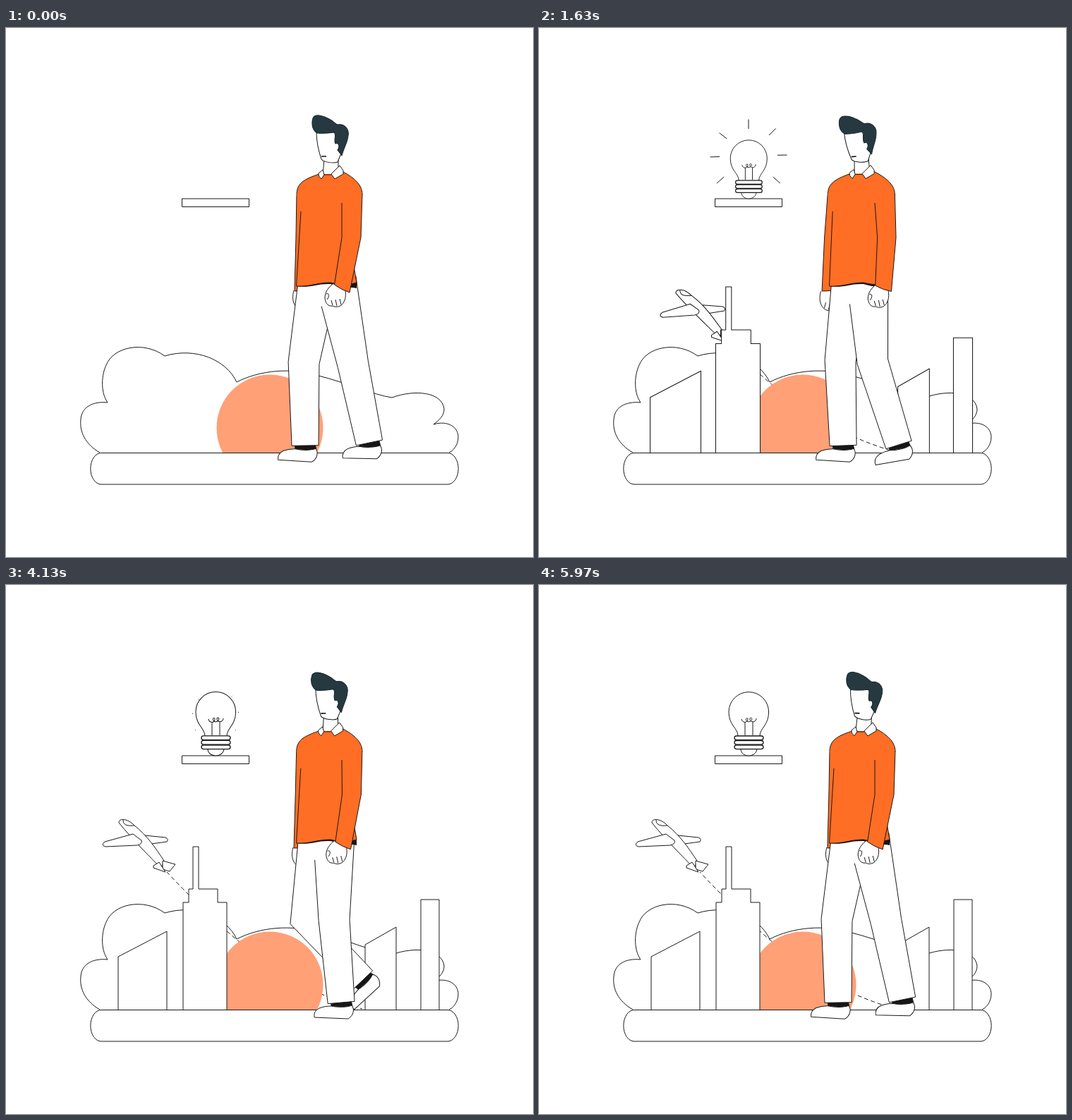
Write an HTML page with a canvas that moves like this. It is 747 by 750 pixels and loops after 6010 ms.

```html
<!DOCTYPE html>
<html lang="en">
<head>
<meta charset="utf-8">
<title>Walking through the city</title>
<style>
html, body { margin: 0; width: 100%; height: 100%; overflow: hidden; background: #fff; }
canvas { display: block; }
</style>
</head>
<body>
<canvas id="stage" width="747" height="750"></canvas>
<script>
const c = document.getElementById('stage').getContext('2d');
const LOOP = 6010, INK = '#1a1a1a', ORANGE = '#ff6e24', HAIR = '#263940', SUN = '#ffa077';

// Smooth curve through rows of [time, ...values], held at both ends.
function spline(rows, x) {
  const last = rows.length - 1;
  if (x <= rows[0][0]) return rows[0].slice(1);
  if (x >= rows[last][0]) return rows[last].slice(1);
  let i = 0;
  while (rows[i + 1][0] <= x) i++;
  const a = rows[i], b = rows[i + 1], before = rows[Math.max(i - 1, 0)], after = rows[Math.min(i + 2, last)];
  const h = b[0] - a[0], u = (x - a[0]) / h;
  return a.slice(1).map((v, k) => {
    const j = k + 1;
    const m = (b[j] - before[j]) / (b[0] - before[0]) * h;
    const n = (after[j] - a[j]) / (after[0] - a[0]) * h;
    return v + u * (m + u * (3 * (b[j] - v) - 2 * m - n + u * (2 * (v - b[j]) + m + n)));
  });
}
const shift = (row, d) => [row[0] + d, ...row.slice(1)];
const cyclic = rows => [shift(rows[rows.length - 1], -1), ...rows, shift(rows[0], 1), shift(rows[1], 1)];

// Leg poses: phase, knee x, knee y, hem x, hem y, foot angle
const NEAR_LEG = cyclic([
  [0, 492, 477, 515, 588, -1], [.085, 473, 473, 510, 591, -12], [.15, 447, 473, 503, 575, -32],
  [.25, 434, 472, 498, 562, -42], [.348, 424, 468, 460, 581, -23], [.486, 421, 465, 412, 584, 0],
  [.585, 429, 468, 422, 588, 0], [.65, 441, 471, 438, 591, 0], [.749, 465, 475, 475, 592, 0],
  [.848, 480, 476, 501, 591, 0], [.974, 492, 477, 515, 588, -1]
]);
const FAR_LEG = cyclic([
  [0, 422, 475, 424, 592, 1], [.085, 427, 472, 431, 592, 1], [.15, 436, 475, 445, 592, 0],
  [.25, 453, 473, 474, 588, 0], [.348, 471, 470, 498, 581, 0], [.486, 479, 470, 510, 579, -1],
  [.585, 459, 472, 511, 583, -13], [.65, 440, 473, 510, 573, -32], [.749, 424, 474, 506, 560, -45],
  [.848, 412, 472, 462, 579, -24], [.974, 422, 475, 424, 592, 1]
]);
const HEAD_LEAN = cyclic([[0, 0], [.062, -1], [.364, -5], [.511, -2.5], [.612, -4], [.814, -6], [.98, 2]]);
const GROW = [[0, 0], [.3, .25], [.4, .37], [.73, .863], [.94, 1.045], [1.1, 1.058], [1.3, 1.043], [1.63, 1.017], [1.95, 1]];
const BULB = [[0, 1], [.364, 1], [.511, .925], [.612, .925], [.814, .92], [.98, 1]];
const RAYS = [[0, 32, 32], [.062, 32, 33], [.364, 32, 41], [.511, 32.5, 53], [.612, 35, 55], [.814, 41, 54.5], [.98, 54, 54]];

function draw(path, fill, stroke = INK, width = 1) {
  const p = new Path2D(path);
  if (fill) { c.fillStyle = fill; c.fill(p); }
  if (stroke) { c.strokeStyle = stroke; c.lineWidth = width; c.stroke(p); }
}
function group(x, y, angle, scale, body) {
  c.save();
  c.translate(x, y);
  c.rotate(angle);
  c.scale(scale, scale);
  body();
  c.restore();
}
const poly = points => 'M' + points.map(p => p.join()).join('L');
const clamp = x => Math.min(1, Math.max(0, x));
const smooth = x => x * x * (3 - 2 * x);

function cloud() {
  draw('M133 602C112 590 104 572 106 555C107 538 122 529 144 531C133 515 136 490 142 478' +
    'C152 452 195 443 225 465C268 452 312 470 327 502C360 485 405 481 443 493C480 502 520 520 547 524' +
    'C580 512 618 516 621 540C621 550 614 556 606 562C625 556 641 565 641 580C641 592 633 600 628 602', '#fff');
}

const bezier = (u, a, b, d, e) => {
  const v = 1 - u;
  return v * v * v * a + 3 * v * v * u * b + 3 * v * u * u * d + u * u * u * e;
};
const route = u => [bezier(u, 505, 400, 330, 228), bezier(u, 601, 570, 515, 407)];

function plane(s) {
  const k = clamp((s - .5) / 1.5);
  const u = k < .5 ? 2 * k * k : 1 - 2 * (1 - k) ** 2;
  if (s < .5) return;
  c.setLineDash([6, 4]);
  c.lineDashOffset = s * 20;
  draw(poly(Array.from({ length: 41 }, (_, i) => route(u * i / 40))));
  c.setLineDash([]);
  const [x, y] = route(u), [x0, y0] = route(u - .01), [ex, ey] = route(1), [fx, fy] = route(.99);
  const turn = Math.atan2(y - y0, x - x0) - Math.atan2(ey - fy, ex - fx);
  group(x, y, turn, clamp((s - .5) / .2), () => {
    c.translate(-228, -407);
    draw('M197 355L226 358Q231 360 228 364L206 367Z', '#fff');
    draw('M160 337C160 330 173 331 182 341C200 355 212 373 224 391L220 402C205 386 180 362 160 337Z', '#fff');
    draw('M166 333C166 340 171 342 182 341', null);
    draw('M180 353L140 364Q134 369 141 371L186 369Q194 367 192 362Z', '#fff');
    draw('M222 391L240 396L232 406L222 403Z', '#fff');
    draw('M217 393L209 398L209 401L226 407Z', '#fff');
  });
}

function building(x, scale, path) {
  if (scale > 0) group(x, 602, 0, scale, () => draw(path, '#fff'));
}
function city(s) {
  const [first] = spline(GROW, s), [second] = spline(GROW, s - .33);
  building(193.5, second, 'M-34.5 0V-75L34.5 -111V0');
  building(282, first, 'M-31 0V-152H-23V-171H-17V-231H-9V-171H18V-152H31V0');
  building(531, first, 'M-22 0V-92L22 -117V0');
  building(601, second, 'M-13 0V-156H13V0');
}

function bulb(s) {
  const phase = s * 1000 / (LOOP / 3) % 1, enter = smooth(clamp(s / .5));
  draw('M249.5 242H344.5V253.5H249.5Z', '#fff');
  if (!enter) return;
  group(297, 241.5, 0, spline(BULB, phase)[0] * enter, () => {
    c.translate(-297, -241.5);
    draw('M286 233C287 245 307 245 309 233', '#fff');
    draw('M282 214C282 203 269 199 269 180A28.3 28.3 0 0 1 325.6 180C325.6 199 313 203 313 214', '#fff');
    draw('M292 213V194M303 213V194M287 190C288 196 296 196 296 190C295 186 290 192 297 194C304 193 302 186 299 189C298 195 308 196 308 189', null);
    for (const y of [214, 220.5, 227])
      draw(`M280 ${y}H315a3 2.8 0 0 1 0 5.6H280a3 2.8 0 0 1 0 -5.6Z`, '#fff', INK, 1.3);
  });
  const [inner, outer] = spline(RAYS, phase);
  if (outer - inner < .3) return;
  const gaps = [-3, 0, 0, 5, 5, 0, -2];
  [-90, -45, -1, 41, 139, 178, 218].forEach((deg, i) => {
    const a = deg * Math.PI / 180;
    draw(poly([inner, outer].map(d => [297 + Math.cos(a) * (d + gaps[i]) * enter, 181 + Math.sin(a) * (d + gaps[i]) * enter])));
  });
}

function leg(hx, hy, start, [kx, ky, ax, ay, angle]) {
  const unit = (x, y) => { const l = Math.hypot(x, y); return [x / l, y / l]; };
  const thigh = unit(kx - hx, ky - hy), shin = unit(ax - kx, ay - ky);
  const knee = unit(thigh[0] + shin[0], thigh[1] + shin[1]);
  // A point beside the bone, with positive offsets to the right
  const side = (x, y, d, off) => [x + d[1] * off, y - d[0] * off];
  const along = d => [hx + thigh[0] * d, hy + thigh[1] * d];
  group(ax, ay, angle * Math.PI / 180, 1, () => {
    draw('M-15 -3H14L16 6L-14 5Z', '#161616');
    draw('M-14 5C-5 7 8 7 15 4C19 9 18 18 10 23L-38 21C-39 15 -37 11 -31 8C-26 6 -21 5 -14 5Z', '#fff');
  });
  const edge = [
    side(...along(start), thigh, -28), side(kx, ky, knee, -22), side(ax, ay, shin, -19),
    side(ax, ay, shin, 19), side(kx, ky, knee, 22), side(...along(12), thigh, 28)
  ];
  draw(poly([...edge, side(...along(14), thigh, -27)]), '#fff', null);
  draw(poly(edge), null);
}

function hand(x, y, flip) {
  c.save();
  c.translate(x, y);
  c.scale(flip, 1);
  draw('M-4 -17C-10 -12 -15 -6 -15 3C-14 11 -10 15 -4 14C1 17 9 15 12 8C15 3 15 -5 13 -12', '#fff');
  draw('M-13 -3C-8 -5 -9 2 -12 5M-6 6L-4 13M0 5L2 14M6 4L8 12', null);
  c.restore();
}

function head() {
  draw('M451 186L449 209L463 210L471 199V184Z', '#fff');
  draw('M440 147C440 160 443 174 447 186C451 191 466 192 470 190L475 178L474 147Z', '#fff');
  draw('M435 128C438 121 450 124 458 129C464 132 467 136 470 137C480 135 487 144 485 153C484 163 479 169 476 181' +
    'L470 173C474 167 471 162 467 164C464 158 469 151 465 148C458 149 450 150 441 149C433 144 433 134 435 128Z', HAIR, '#17252b');
  draw('M447 182H454', null, '#111', 1.6);
}

function person(s) {
  const stride = s * 1000 / (LOOP / 4) % 1, swing = s * 1000 / (LOOP / 3) % 1;
  const k = (1 - Math.cos(swing * 2 * Math.PI)) / 2;
  const dx = -9.5 * k, dy = -1.5 * k;

  const farX = 412 - 9 * k, cuff = 409 - 26 * k;
  hand(421 - 28 * k, 384 + 4 * k, -1);
  draw(`M${farX} 235L${411 - 21 * k} 297L${cuff} 373Q${cuff + 12} 374 ${cuff + 26} 369L430 240`, ORANGE);

  leg(445, 343, 14, spline(FAR_LEG, stride));
  leg(466, 345, 45, spline(NEAR_LEG, stride));

  // Sweater
  const left = `M${farX} 235C${farX + 1} 221 ${420 + dx * .8} 215 ${444 + dx} ${207 + dy}`;
  const right = `C${493 + dx * .5} 212 ${505 - 2 * k} 222 ${505 - 2 * k} 236`;
  const inner = 418 - 6 * k;
  draw('M411 366C432 369 440 362 460 363C475 368 488 367 497 369V358L411 362Z', '#161616', null);
  draw(`${left}L${478 + dx} ${204 + dy}${right}L490 320L497 361C487 364 475 365 460 361C440 361 432 367 411 366L${inner} 260Z`, ORANGE, null);
  draw(left, null);
  draw(`M${478 + dx} ${204 + dy}${right}`, null);
  draw(`M${inner} 260L411.5 366C432 367 440 361 460 361C475 365 487 364 497 361L490 320`, null);

  // Head and collar
  group(458 + dx, 198 + dy, spline(HEAD_LEAN, swing)[0] / 66, 1, () => {
    c.translate(-458, -198);
    head();
  });
  c.save();
  c.translate(dx, dy);
  draw('M447 213L451 207H462L466 214Z', ORANGE, null);
  draw('M449 201L443 206Q442 210 447 214L451 208Z', '#fff');
  draw('M473 195L461 207L466 214L478 207V202Z', '#fff');
  draw('M451 208H461', null);
  c.restore();

  // Near arm
  hand(467 + 47 * k, 380 + 3 * k, 1);
  const sleeve = `M476 248L${476 + 12 * k} 297L${465.5 + 37 * k} ${364 + 4 * k}` +
    `Q${475 + 40 * k} ${371 + k} ${487 + 41 * k} ${375 - 5 * k}L${503 + 10 * k} 297L${505 - 2 * k} 235`;
  draw(sleeve + 'L490 225Z', ORANGE, null);
  draw(sleeve, null);
}

function frame(now) {
  const s = now % LOOP / 1000;
  c.fillStyle = '#fff';
  c.fillRect(0, 0, 747, 750);
  c.lineJoin = 'round';
  cloud();
  plane(s);
  draw('M298.5 567a75.5 75.5 0 0 1 151 0a75.5 75.5 0 0 1 -151 0Z', SUN, null);
  city(s);
  draw('M135 602.5H626A15 22 0 0 1 626 647H135A15 22 0 0 1 135 602.5Z', '#fff');
  bulb(s);
  person(s);
}

const begin = performance.now();
function tick() {
  frame(performance.now() - begin);
  requestAnimationFrame(tick);
}
tick();
</script>
</body>
</html>
```
